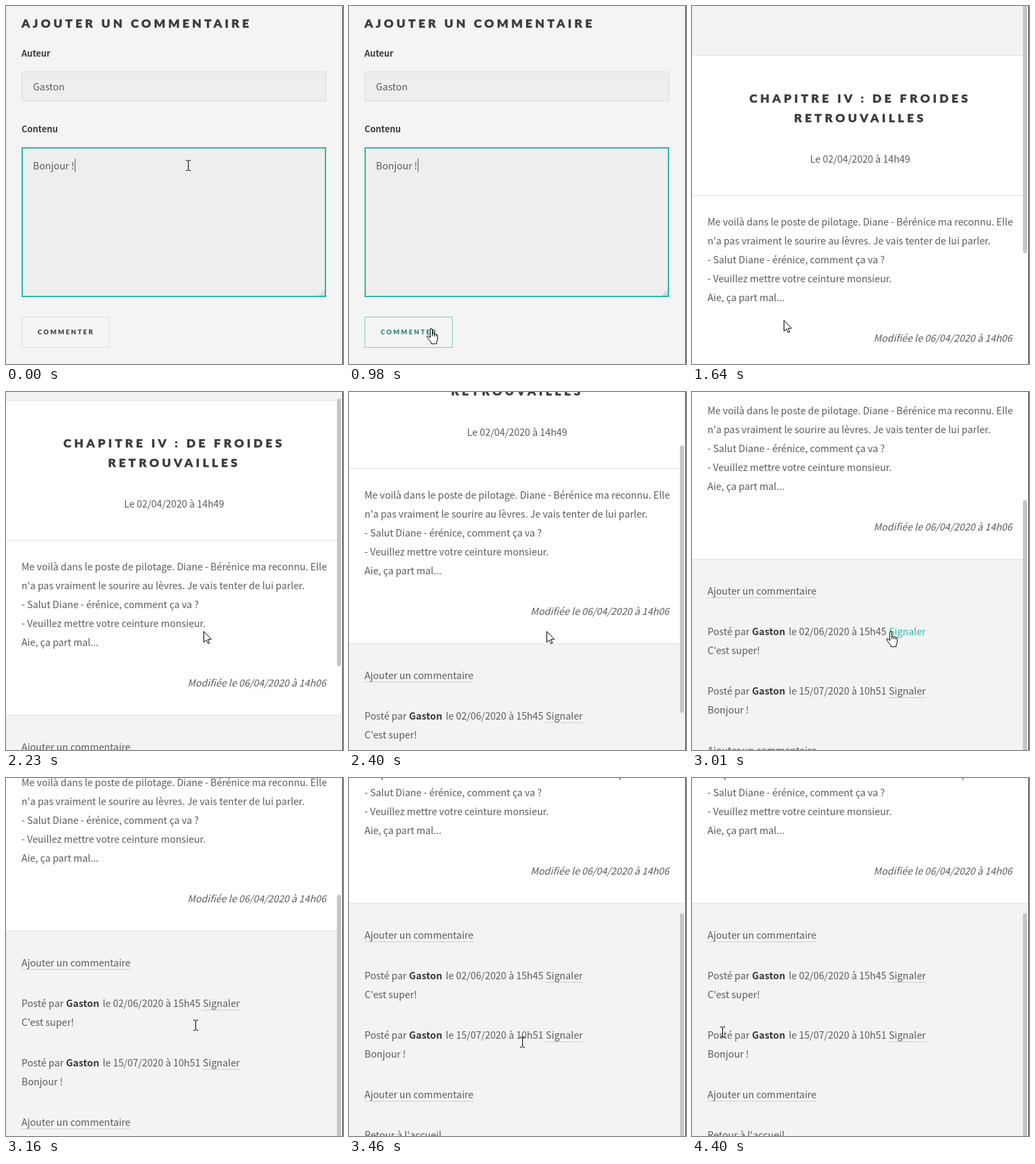
Animation, 500 px wide and 530 px high, one loop 4.65 s. Source, as an HTML page:

```html
<!DOCTYPE html>
<html lang="fr">
<head>
<meta charset="utf-8">
<title>Ajouter un commentaire</title>
<style>
  html, body { margin: 0; width: 100%; height: 100%; overflow: hidden; background: #f4f4f4; }
  svg { display: block; }
  text { font: 14.32px "Noto Sans CJK JP", "Noto Sans CJK SC", "Noto Sans CJK", "Noto Sans", sans-serif; fill: #5c5c5c; white-space: pre; }
  .bold { font-weight: 700; fill: #3c3b3b; }
  .label { font-size: 12.9px; }
  .italic { font-style: italic; text-anchor: end; }
  .title, .action { font-family: Lato, "Open Sans", sans-serif; font-weight: 900; fill: #3c3b3b; }
  .title { font-size: 17.6px; letter-spacing: 4.3px; stroke: #3c3b3b; stroke-width: .4px; }
  .centered { text-anchor: middle; letter-spacing: 4.4px; }
  .date { text-anchor: middle; }
  .action { font-size: 9.6px; letter-spacing: 2.35px; }
  .underline { stroke: #aaa; stroke-dasharray: 1 1; }
  .rule { fill: #e2e2e2; }
  .field { fill: #eee; stroke: #dadada; }
  .hovered text { fill: #2ebaae; }
  .hovered path { display: none; }
  #cursor path { fill: #fff; stroke: #000; stroke-linejoin: round; }
  #cursor #beam { fill: none; }
</style>
</head>
<body>
<svg width="500" height="530" viewBox="0 0 500 530">
  <g id="form">
    <rect width="500" height="530" fill="#f4f4f4"/>
    <text class="title" x="23" y="32">AJOUTER UN COMMENTAIRE</text>
    <text class="bold label" x="23" y="75">Auteur</text>
    <rect class="field" x="23.5" y="97.5" width="451" height="43"/>
    <text x="40" y="125">Gaston</text>
    <text class="bold label" x="23" y="187">Contenu</text>
    <rect class="field" x="23.5" y="209.5" width="451" height="221"/>
    <rect id="focus" x="24" y="210" width="450" height="220" fill="none" stroke="#2eb5aa" stroke-width="2"/>
    <path d="M471 422h2M468 425h2m1 0h2M465 428h2m1 0h2m1 0h2" stroke="#b4b4b4" stroke-width="1.5"/>
    <text x="40" y="242">Bonjour !</text>
    <rect id="caret" x="102" y="226" width="1" height="20" fill="#555"/>
    <rect id="button" x="23.5" y="460.5" width="130" height="45" fill="none"/>
    <text id="buttonText" class="action" x="47" y="486">COMMENTER</text>
  </g>
  <g id="article">
    <rect width="500" height="530" fill="#f3f3f3"/>
    <g id="page">
      <rect y="14" width="500" height="465" fill="#fff"/>
      <rect class="rule" y="13" width="498" height="1"/>
      <rect class="rule" y="220" width="498" height="1"/>
      <rect class="rule" y="479" width="498" height="1"/>
      <text class="title centered" x="249.5" y="83">CHAPITRE IV : DE FROIDES</text>
      <text class="title centered" x="249.5" y="112">RETROUVAILLES</text>
      <text class="date" x="249.5" y="172">Le 02/04/2020 à 14h49</text>
      <text class="italic" x="475" y="437">Modifiée le 06/04/2020 à 14h06</text>
    </g>
    <rect id="thumb" x="491" width="6" height="396" rx="3" fill="#c6c6c6"/>
  </g>
  <rect x="499" width="1" height="530" fill="#333"/>
  <g id="cursor">
    <path id="beam" d="M-3-7.5H-1L.5-6.5 2-7.5H4M.5-6.5V6.5M-3 7.5H-1L.5 6.5 2 7.5H4"/>
    <path id="arrow" d="M.5 .5V16.5L4.3 13 6.8 18.6 9 17.6 6.6 12.2H11.7Z"/>
    <path id="hand" d="M.5 13V2Q.5 .5 2 .5T3.5 2V8Q5 7 6.5 8.5 8 7.7 9.3 9.3 11.5 9 11.5 11.5V16Q11.5 18 10 20V23H2V21Q0 19-2.5 15.5-5 12.5-4 11.5-2.5 10.5 .5 14ZM3.5 8v4M6.5 8.5v3.5M9.3 9.5v3"/>
  </g>
</svg>
<script>
const LOOP = 4650;
const CLICK = 1070;
const PAGE_LOAD = 1550;
const LINE = 28;
const COMMENTS_TOP = 572;
const COMMENT_PITCH = 88;
const $ = id => document.getElementById(id);

function add(parent, tag, attrs, content = '') {
  const node = document.createElementNS('http://www.w3.org/2000/svg', tag);
  for (const name in attrs) node.setAttribute(name, attrs[name]);
  node.textContent = content;
  parent.append(node);
  return node;
}
const write = (x, y, content, cls = '') => add($('page'), 'text', { x, y, class: cls }, content);

function link(x, y, width, content) {
  const group = add($('page'), 'g', {});
  add(group, 'text', { x, y }, content);
  add(group, 'path', { d: `M${x} ${y + 4.5}h${width}`, class: 'underline' });
  return group;
}
function comment(index, date, content) {
  const y = COMMENTS_TOP + 20 + COMMENT_PITCH * index;
  write(23, y, 'Posté par');
  write(89, y, 'Gaston', 'bold');
  write(143.5, y, 'le ' + date);
  write(23, y + LINE, content);
  return link(292, y, 55, 'Signaler');
}

[
  'Me voilà dans le poste de pilotage. Diane - Bérénice ma reconnu. Elle',
  "n'a pas vraiment le sourire au lèvres. Je vais tenter de lui parler.",
  '- Salut Diane - érénice, comment ça va ?',
  '- Veuillez mettre votre ceinture monsieur.',
  'Aie, ça part mal...'
].forEach((line, i) => write(23, 265 + LINE * i, line));
link(23, 532, 162, 'Ajouter un commentaire');
const report = comment(0, '02/06/2020 à 15h45', "C'est super!");
comment(1, '15/07/2020 à 10h51', 'Bonjour !');
link(23, 768, 162, 'Ajouter un commentaire');
link(23, 828, 114, "Retour à l'accueil");

// Key points: time, then values
const pointerPath = [
  [200, 270, 236], [700, 228, 452], [880, 150, 485], [980, 120, 477], [1600, 120, 477],
  [2030, 293, 354], [3010, 293, 354], [3460, 258, 391], [3700, 120, 440], [4070, -5, 400], [4400, 45, 376]
];
const scrollPath = [[2110, -60], [2230, 0], [2550, 200], [2690, 225], [2960, 225], [3460, 294]];

function along(path, t) {
  const next = path.findIndex(key => key[0] > t);
  const b = path.at(next);
  const a = next > 0 ? path[next - 1] : b;
  const p = a === b || next < 0 ? 1 : (t - a[0]) / (b[0] - a[0]);
  return a.slice(1).map((v, i) => Math.round(v + (b[i + 1] - v) * p));
}
const fade = (t, start) => Math.min(1, Math.max(0, (t - start) / 200));
const mix = (a, b, p) => `rgb(${a.map((v, i) => Math.round(v + (b[i] - v) * p))})`;
const show = (id, visible) => { $(id).style.display = visible ? '' : 'none'; };

const TEAL = [46, 186, 174], DARK = [60, 59, 59], BORDER = [218, 218, 218];

function formCursor(x, y) {
  if (y < 431) return 'beam';
  return y > 460 && x < 154 ? 'hand' : 'arrow';
}
function articleCursor(x, pageY, onLink) {
  if (onLink) return 'hand';
  const row = pageY - COMMENTS_TOP;
  return x > 23 && row > 24 && row % COMMENT_PITCH < 2 * LINE ? 'beam' : 'arrow';
}

function draw(t) {
  const onForm = t < PAGE_LOAD;
  show('form', onForm);
  show('article', !onForm);

  const focused = t < CLICK;
  show('focus', focused);
  show('caret', focused && (t + 470) % 1000 < 500);
  const hover = fade(t, 880);
  $('button').style.stroke = mix(BORDER, TEAL, hover);
  $('buttonText').style.fill = mix(DARK, TEAL, hover);

  const [scroll] = along(scrollPath, t);
  $('page').setAttribute('transform', `translate(0 ${-scroll})`);
  $('thumb').setAttribute('y', Math.round(9 + scroll * 0.65));

  const [x, y] = along(pointerPath, t);
  const pageY = y + scroll;
  const onLink = !onForm && x >= 290 && pageY > 576 && pageY < 597;
  report.classList.toggle('hovered', onLink);
  const shape = onForm ? formCursor(x, y) : articleCursor(x, pageY, onLink);
  $('cursor').setAttribute('transform', `translate(${x} ${y})`);
  for (const id of ['beam', 'arrow', 'hand']) show(id, id === shape);
}

const start = performance.now();
function tick() {
  draw((performance.now() - start) % LOOP);
  requestAnimationFrame(tick);
}
tick();
</script>
</body>
</html>
```
